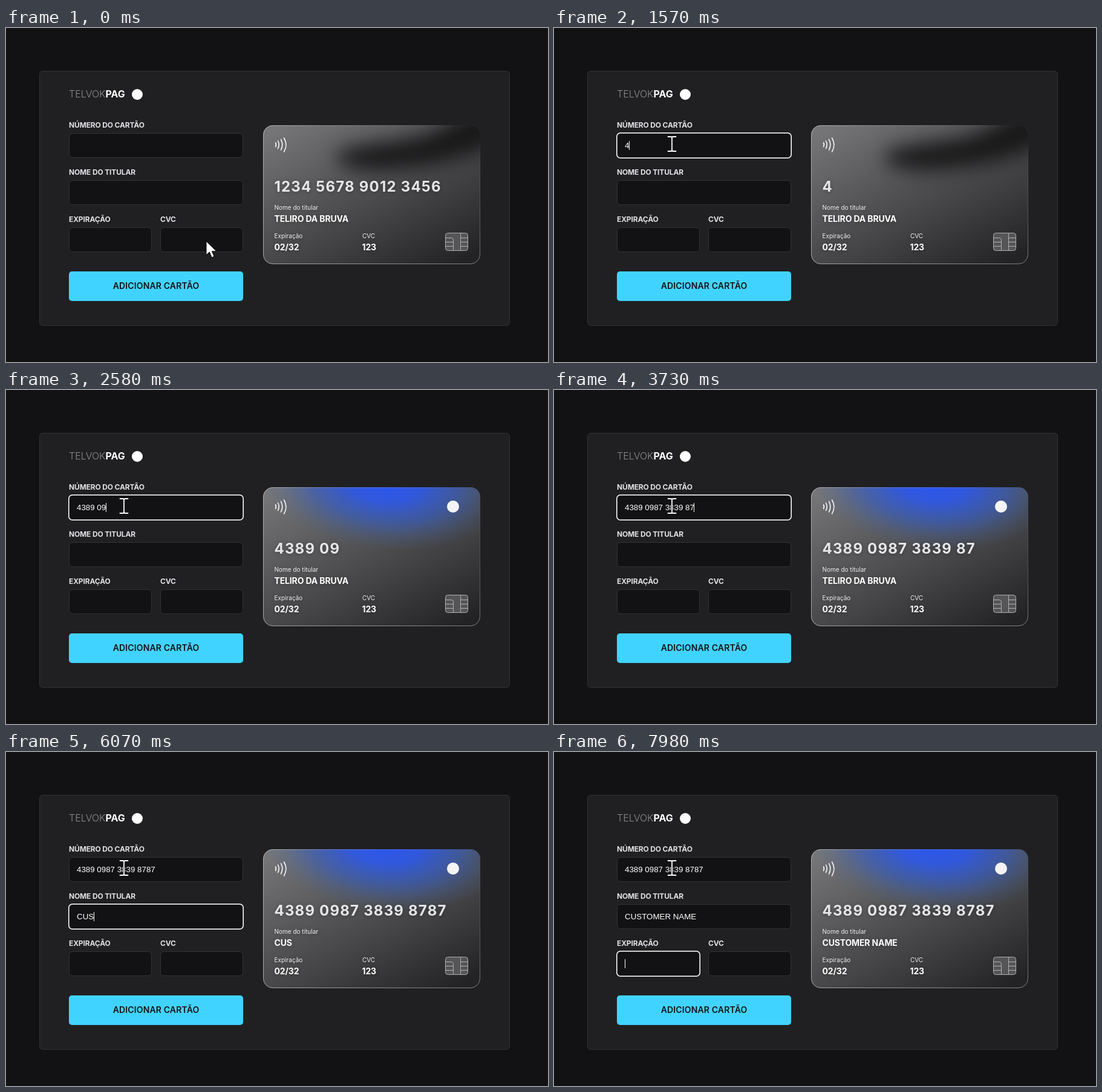
An HTML page for the animation above (8 s loop, 896 by 553 pixels).

```html
<!DOCTYPE html>
<html lang="pt-BR">
<head>
<meta charset="utf-8">
<title>Cartão</title>
<style>
  html, body { margin: 0; width: 100%; height: 100%; overflow: hidden; background: #121214; }
  svg { display: block; width: 100%; height: 100%; }
  text { font-family: Inter, sans-serif; fill: #fff; white-space: pre; }
  .label { font-size: 12px; font-weight: 700; letter-spacing: -.15px; fill: #e1e1e6; }
  .typed { font-family: "Liberation Sans", Arial, sans-serif; font-size: 13.333px; }
  .small { font-size: 10px; fill: #f0f0f2; }
  .bold { font-size: 14px; font-weight: 700; letter-spacing: -.15px; }
  .button { font-size: 14px; font-weight: 600; letter-spacing: .15px; fill: #121214; }
  .number { font-size: 24px; font-weight: 700; letter-spacing: 1.2px; fill: #e6e6e8; }
  .on-card { filter: drop-shadow(0 1px 3px rgba(0, 0, 0, .3)); }
  .line { fill: none; stroke: #fff; stroke-linecap: round; }
</style>
</head>
<body>
<svg viewBox="0 0 896 553">
  <defs>
    <linearGradient id="glass" gradientUnits="userSpaceOnUse" x1="510" y1="130" x2="670" y2="430">
      <stop offset="0" stop-color="#767678"/>
      <stop offset=".35" stop-color="#59595b"/>
      <stop offset=".65" stop-color="#414143"/>
      <stop offset="1" stop-color="#232326"/>
    </linearGradient>
    <linearGradient id="rim" x1="0" y1="1" x2="1" y2="0">
      <stop offset="0" stop-color="#fff" stop-opacity=".5"/>
      <stop offset=".5" stop-color="#fff" stop-opacity=".42"/>
      <stop offset=".65" stop-color="#fff" stop-opacity=".2"/>
      <stop offset=".95" stop-color="#fff" stop-opacity="0"/>
    </linearGradient>
    <radialGradient id="blue" gradientUnits="userSpaceOnUse" cx="0" cy="0" r="1"
      gradientTransform="translate(625 152) rotate(6) scale(205 112)">
      <stop offset="0" stop-color="#2c56f0"/>
      <stop offset=".3" stop-color="#2f58e2" stop-opacity=".95"/>
      <stop offset=".6" stop-color="#365cc0" stop-opacity=".65"/>
      <stop offset=".85" stop-color="#3f61a8" stop-opacity=".2"/>
      <stop offset="1" stop-color="#3f61a8" stop-opacity="0"/>
    </radialGradient>
    <filter id="soft" x="-30%" y="-80%" width="160%" height="260%" color-interpolation-filters="sRGB">
      <feGaussianBlur stdDeviation="16"/>
    </filter>
    <clipPath id="cardClip"><rect x="425" y="161" width="359" height="230" rx="16"/></clipPath>
  </defs>

  <rect width="896" height="553" fill="#121214"/>
  <rect x="55.5" y="71.5" width="777" height="421" rx="5" fill="#202022" stroke="#323235"/>

  <text x="104" y="115" font-size="16" font-weight="300" style="fill:#8d8d93">TELVOK<tspan font-weight="700" fill="#fff">PAG</tspan></text>
  <circle cx="217" cy="110" r="9" fill="#fff"/>

  <g id="form"></g>
  <rect id="caret" width="1" height="15" fill="#fff"/>

  <rect x="104" y="403" width="288" height="49" rx="5" fill="#41d3ff"/>
  <text class="button" x="248" y="432" text-anchor="middle">ADICIONAR CARTÃO</text>

  <g clip-path="url(#cardClip)">
    <rect x="425" y="161" width="359" height="230" fill="url(#glass)"/>
    <path id="shade" d="M545 210C575 188 645 194 700 174C735 160 750 140 830 110V182C770 216 700 230 645 234C600 238 550 236 545 210Z"
      fill="#171718" fill-opacity=".95" filter="url(#soft)"/>
    <rect id="tint" x="425" y="161" width="359" height="230" fill="url(#blue)"/>
  </g>
  <rect x="425.5" y="161.5" width="358" height="229" rx="15.5" fill="none" stroke="url(#rim)"/>

  <path class="line" stroke-width="1.5" d="M445.5 190q2 3.2 0 6.5M449.5 187q3.4 6 0 12.5M454.5 184.5q4.6 8.7 0 17.5M459.5 182q7 11.5 0 23"/>
  <circle id="brand" cx="739" cy="193" r="10" fill="#f4f4f6"/>

  <g class="on-card">
    <text id="cardNumber" class="number" x="443.5" y="271"></text>
    <text class="small" x="443.5" y="301">Nome do titular</text>
    <text id="cardName" class="bold" x="443.5" y="321"></text>
    <text class="small" x="443.5" y="348">Expiração</text>
    <text class="bold" x="443.5" y="368">02/32</text>
    <text class="small" x="589" y="348">CVC</text>
    <text class="bold" x="588.5" y="368">123</text>
  </g>
  <g fill="none" stroke="#b0b0b2">
    <rect x="726.5" y="339.5" width="37" height="29" rx="4" fill="#555558"/>
    <path d="M727 347.5h9q3.5 0 3.5 3.5v17M727 354.5h12M727 361.5h12M751.5 340v28M764 347.5h-12M764 354.5h-12M764 361.5h-12"/>
  </g>

  <path id="arrow" d="M0 0V23L5.3 18L9.2 27L13.2 25.2L9.4 16.7H17Z" fill="#fff" stroke="#000"/>
  <g id="beam" class="line">
    <path id="beamShape" d="M-6.5-12H-2Q0-12 0-10V10Q0 12-2 12H-6.5M6.5-12H2Q0-12 0-10M0 10Q0 12 2 12H6.5"/>
  </g>
  <circle id="click" cx="192" cy="190" fill="#ff0" fill-opacity=".48"/>
</svg>
<script>
const LOOP = 8000;
const NUMBER = "4389 0987 3839 8787", NAME = "CUSTOMER NAME";
const $ = id => document.getElementById(id);
const NS = "http://www.w3.org/2000/svg";

function add(parent, tag, attrs, text = "") {
  const el = parent.appendChild(document.createElementNS(NS, tag));
  for (const key in attrs) el.setAttribute(key, attrs[key]);
  el.textContent = text;
  return el;
}

function makeField(label, x, y, w) {
  const form = $("form");
  add(form, "text", { class: "label", x, y: y - 9 }, label);
  add(form, "rect", { x: x + .5, y: y + .5, width: w - 1, height: 40, rx: 5.5, fill: "#121214", stroke: "#323235" });
  const ring = add(form, "rect", { x: x - .25, y: y - .25, width: w + .5, height: 41.5, rx: 6, fill: "none", stroke: "#fff", "stroke-width": 1.5 });
  const text = add(form, "text", { class: "typed", x: x + 13, y: y + 25 });
  return { x, y, ring, text };
}

const fields = [
  makeField("NÚMERO DO CARTÃO", 104, 174, 288),
  makeField("NOME DO TITULAR", 104, 252, 288),
  makeField("EXPIRAÇÃO", 104, 330, 137),
  makeField("CVC", 255, 330, 137)
];

// White beam over a dark outline
const outline = $("beamShape");
const core = outline.cloneNode();
core.removeAttribute("id");
outline.setAttribute("stroke", "#121214");
outline.setAttribute("stroke-width", 3.6);
core.setAttribute("stroke-width", 1.8);
$("beam").append(core);

// Each step: start time, then its values
const numberSteps = [[0, 0], [1570, 1], [1770, 2], [2040, 3], [2310, 4], [2580, 7], [2780, 9], [3060, 11],
  [3150, 12], [3250, 13], [3450, 16], [3730, 17], [4130, 18], [4400, 19]];
const nameSteps = [[0, 0], [5720, 1], [5920, 2], [6070, 3], [6200, 4], [6330, 5], [6530, 6], [6620, 7],
  [6720, 8], [6860, 9], [6990, 10], [7120, 11], [7250, 12], [7380, 13]];
const focusSteps = [[0, -1], [640, 0], [5060, 1], [7980, 2]];
const caretGaps = [[1110, 1570], [5590, 5720], [7920, 7980]];
const pointerSteps = [[0, 331, 353], [70, 312, 297], [230, 258, 236], [300, 223, 207], [370, 204, 196], [430, 195, 192]];
const clickSteps = [[0, 0], [500, 24], [570, 18], [640, 0]];

const stepAt = (steps, t) => steps.filter(s => s[0] <= t).pop().slice(1);
const show = (el, on) => el.setAttribute("visibility", on ? "visible" : "hidden");
const setText = (el, value) => { if (el.textContent !== value) el.textContent = value; };

const pen = document.createElement("canvas").getContext("2d");
pen.font = '13.333px "Liberation Sans", Arial, sans-serif';

function draw(t) {
  const typed = [
    NUMBER.slice(0, stepAt(numberSteps, t)[0]),
    NAME.slice(0, stepAt(nameSteps, t)[0]), "", ""
  ];
  const focus = stepAt(focusSteps, t)[0];
  fields.forEach((field, i) => {
    setText(field.text, typed[i]);
    show(field.ring, i === focus);
  });

  const active = fields[focus];
  show($("caret"), active && !caretGaps.some(([a, b]) => t >= a && t < b));
  if (active) {
    $("caret").setAttribute("x", Math.floor(active.x + 13 + pen.measureText(typed[focus]).width));
    $("caret").setAttribute("y", active.y + 13);
  }

  setText($("cardNumber"), typed[0] || "1234 5678 9012 3456");
  setText($("cardName"), typed[1] || "TELIRO DA BRUVA");
  const known = t >= 2580;
  show($("shade"), !known);
  show($("tint"), known);
  show($("brand"), known);

  const [x, y] = stepAt(pointerSteps, t);
  const overField = t >= 300;
  show($("arrow"), !overField);
  show($("beam"), overField);
  $(overField ? "beam" : "arrow").setAttribute("transform", `translate(${x} ${y})`);
  $("click").setAttribute("r", stepAt(clickSteps, t)[0]);
}

function tick() {
  draw(performance.now() % LOOP);
  requestAnimationFrame(tick);
}
tick();
</script>
</body>
</html>
```
